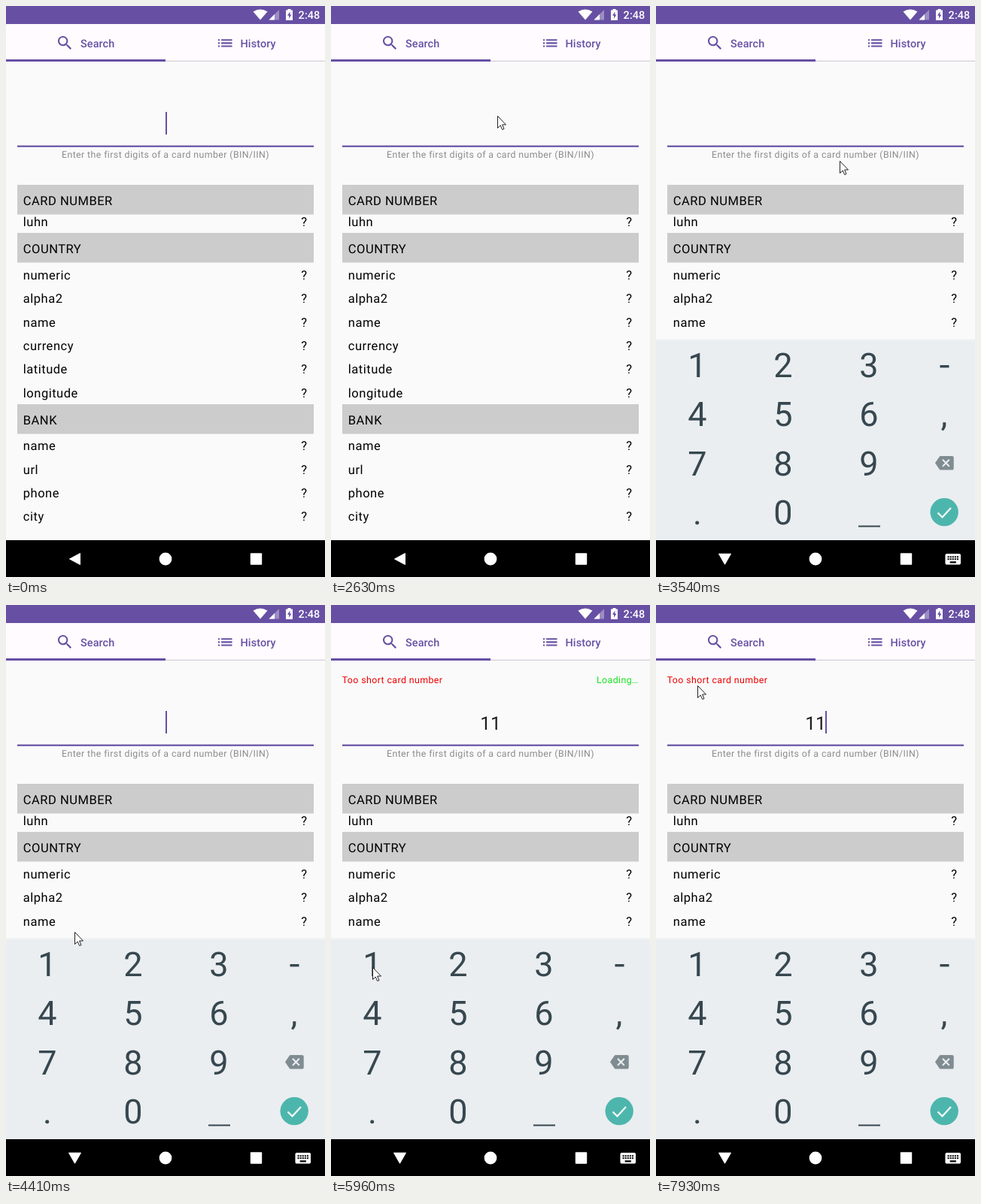
An HTML page that plays this animation: 424x760 px, repeating every 8 s.

```html
<!DOCTYPE html>
<html lang="en">
<head>
<meta charset="utf-8">
<title>Card lookup</title>
<style>
  html, body { margin: 0; width: 100%; height: 100%; overflow: hidden; background: #fafafa; }
  svg { display: block; width: 424px; height: 760px; }
  text { font-family: Roboto, sans-serif; white-space: pre; text-rendering: geometricPrecision; }
  .row { font-size: 16.5px; letter-spacing: .515px; }
  .small { font-size: 12.37px; letter-spacing: .4px; }
  .tab { font-size: 14.43px; font-weight: 500; letter-spacing: .1px; }
  .key { font-size: 45px; fill: #37474f; text-anchor: middle; }
</style>
</head>
<body>
<svg viewBox="0 0 424 760">
  <rect width="424" height="760" fill="#fafafa"/>

  <rect width="424" height="24" fill="#6750a4"/>
  <g fill="#fff">
    <path d="M338 18.5L328.5 7.5Q338 1.5 347.5 7.5Z"/>
    <path d="M363 5V18.5H349.5Z" opacity=".35"/>
    <path d="M357 11V18.5H349.5Z"/>
    <path d="M372 5.5h2.5V4h4v1.5H381V19h-9Z"/>
    <path d="M377.4 7.5L374 12.8h2.1v4l3.3-5.4h-2Z" fill="#6750a4"/>
    <text class="tab" x="388.6" y="17">2:48</text>
  </g>

  <rect y="24" width="424" height="49" fill="#fffbfe"/>
  <rect y="72.8" width="424" height="1" fill="#cac4d0"/>
  <g fill="#6750a4">
    <rect y="71" width="212" height="3"/>
    <path transform="translate(65.9 36.8) scale(1.03)" d="M15.5 14h-.79l-.28-.27C15.41 12.59 16 11.11 16 9.5 16 5.91 13.09 3 9.5 3S3 5.91 3 9.5 5.91 16 9.5 16c1.61 0 3.09-.59 4.23-1.57l.27.28v.79l5 4.99L20.49 19l-4.99-5zm-6 0C7.01 14 5 11.99 5 9.5S7.01 5 9.5 5 14 7.01 14 9.5 11.99 14 9.5 14z"/>
    <path transform="translate(278.9 37) scale(1.03)" d="M3 13h2v-2H3v2zm0 4h2v-2H3v2zm0-8h2V7H3v2zm4 4h14v-2H7v2zm0 4h14v-2H7v2zM7 7v2h14V7H7z"/>
    <text class="tab" x="99" y="55">Search</text>
    <text class="tab" x="311.5" y="55">History</text>
    <rect x="15" y="185.6" width="394" height="2.2"/>
    <rect id="caret" y="141" width="2" height="30"/>
  </g>

  <text id="error" class="small" x="14.7" y="104.3" fill="#f00000">Too short card number</text>
  <text id="loading" class="small" x="353" y="104.3" fill="#14e61e">Loading…</text>
  <text id="entry" x="212" y="165.6" font-size="24.7" text-anchor="middle"></text>
  <text class="small" x="74" y="201.5" fill="#8c8c8c">Enter the first digits of a card number (BIN/IIN)</text>
  <g id="list"></g>

  <rect y="711" width="424" height="49"/>
  <g id="keyboard">
    <rect y="443" width="424" height="3" fill="#f1f3f5"/>
    <rect y="445" width="424" height="266" fill="#eaeef1"/>
    <rect id="press" x="2" y="450" width="106" height="54" rx="3" fill="#dde3e6"/>
    <g id="keys"></g>
    <text id="tint" class="key" x="55" y="494" style="fill:#14c81e" clip-path="inset(0 0 0 14px)">1</text>
    <g fill="#37474f">
      <rect x="377.5" y="478" width="12" height="3.4"/>
      <rect x="269" y="691.5" width="29" height="2"/>
    </g>
    <path transform="translate(371 595.9) scale(1.03)" fill="#7f8c92" d="M22 3H7c-.69 0-1.23.35-1.59.88L0 12l5.41 8.11c.36.53.9.89 1.59.89h15c1.1 0 2-.9 2-2V5c0-1.1-.9-2-2-2zm-3 12.59L17.59 17 14 13.41 10.41 17 9 15.59 12.59 12 9 8.41 10.41 7 14 10.59 17.59 7 19 8.41 15.41 12 19 15.59z"/>
    <circle cx="383.2" cy="673.6" r="18.7" fill="#4db6ac"/>
    <path d="M374.5 674.5l6 6 11.5-12.5" fill="none" stroke="#fff" stroke-width="2.2"/>
    <rect y="711" width="424" height="49"/>
  </g>

  <g fill="#fff">
    <path id="back" stroke="#fff" stroke-linejoin="round"/>
    <circle cx="212" cy="736" r="8.4"/>
    <rect x="324.8" y="728.3" width="15.4" height="15.4" rx="1"/>
    <path id="ime" transform="translate(382.4 723.9) scale(1.03)" d="M20 5H4c-1.1 0-1.99.9-1.99 2L2 17c0 1.1.9 2 2 2h16c1.1 0 2-.9 2-2V7c0-1.1-.9-2-2-2zm-9 3h2v2h-2V8zm0 3h2v2h-2v-2zM8 8h2v2H8V8zm0 3h2v2H8v-2zm-1 2H5v-2h2v2zm0-3H5V8h2v2zm9 7H8v-2h8v2zm0-4h-2v-2h2v2zm0-3h-2V8h2v2zm3 3h-2v-2h2v2zm0-3h-2V8h2v2z"/>
  </g>
  <path id="pointer" d="M.5.5V16.5L4.2 13L6.7 18.5L9 17.5L6.6 12H11.5Z" fill="#fff" stroke-width="1"/>
</svg>

<script>
const LOOP = 8000;
const $ = id => document.getElementById(id);
const [caret, error, loading, entry, keyboard, press, tint, back, ime, pointer] =
  ['caret', 'error', 'loading', 'entry', 'keyboard', 'press', 'tint', 'back', 'ime', 'pointer'].map($);

// List: header top, first row baseline, row names
const sections = [
  ['CARD NUMBER', 238, 293, 'luhn'],
  ['COUNTRY', 302, 363.8, 'numeric alpha2 name currency latitude longitude'],
  ['BANK', 530, 591.2, 'name url phone city']
];
$('list').innerHTML = sections.map(([title, top, base, names]) =>
  `<rect x="15" y="${top}" width="394" height="39.5" fill="#ccc"/>
   <text class="row" x="22.8" y="${top + 26.5}">${title}</text>` +
  names.split(' ').map((name, i) => {
    const y = base + i * 31.4;
    return `<text class="row" x="22.8" y="${y}">${name}</text><text class="row" x="392.2" y="${y}">?</text>`;
  }).join('')
).join('');

const columns = [55, 169, 283, 383];
$('keys').innerHTML = ['123 ', '456,', '789 ', '.0  '].map((line, r) =>
  [...line].map((c, i) => `<text class="key" x="${columns[i]}" y="${494 + r * 65.3}">${c}</text>`).join('')
).join('');

// Pointer: first change, last change, steps, way points
const moves = [
  [460, 1030, 9, [394, 744], [314, 438]],
  [2160, 2760, 10, [314, 438], [204, 108], [225, 156]],
  [3170, 3470, 5, [225, 156], [244, 206]],
  [3940, 4600, 11, [244, 206], [57, 486]],
  [5080, 5220, 3, [57, 486], [55, 482]],
  [6690, 7440, 12, [55, 482], [24, 220], [18, 130], [21, 103]],
  [7510, 7930, 7, [21, 103], [50, 101], [55, 107]]
];
const blinks = [490, 1000, 1490, 2020, 2520, 3030, 3540, 4040, 4540, 4880, 5960, 6490, 7000, 7510];
const slide = [[0, 0], [2960, .12], [3030, .5], [3100, .85], [3170, 1]];

const within = (t, a, b) => t >= a && t < b;
const show = (el, on) => el.setAttribute('visibility', on ? 'visible' : 'hidden');

function along(points, k) {
  const s = k * k * (3 - 2 * k) * (points.length - 1);
  const i = Math.min(Math.floor(s), points.length - 2);
  return points[i].map((v, axis) => v + (points[i + 1][axis] - v) * (s - i));
}

function pointerAt(t) {
  const move = moves.filter(m => t >= m[0]).pop();
  if (!move) return null;
  const [from, to, steps, ...points] = move;
  const step = Math.floor((t - from) / (to - from) * (steps - 1) + 1e-6) + 1;
  return along(points, Math.min(1, step / steps));
}

function draw(t) {
  const typed = t < 4810 ? '' : t < 5410 ? '1' : '11';
  const flash = within(t, 4810, 4880);
  entry.textContent = typed;
  entry.setAttribute('fill', flash ? '#14e61e' : '#1c1b1f');
  caret.setAttribute('x', [212, 219, 225][typed.length]);
  show(caret, blinks.filter(b => t >= b).length % 2 === 0);
  show(error, t >= 5480);
  show(loading, within(t, 4810, 6130));

  const p = slide.filter(s => t >= s[0]).pop()[1];
  keyboard.setAttribute('transform', `translate(0 ${146 * (1 - p)})`);
  keyboard.setAttribute('opacity', p);
  show(press, within(t, 4670, 4810) || within(t, 5280, 5410));
  show(tint, flash);
  show(ime, p > 0);
  back.setAttribute('d', p > 0 ? 'M83.5 729.2H99.5L91.5 743.2Z' : 'M84.5 736L98.5 728.5V743.5Z');

  const at = pointerAt(t);
  show(pointer, at);
  if (at) pointer.setAttribute('transform', `translate(${at.map(Math.round)})`);
  pointer.setAttribute('stroke', flash ? '#14e61e' : '#222');
}

const start = performance.now();
function frame() {
  draw((performance.now() - start) % LOOP);
  requestAnimationFrame(frame);
}
frame();
</script>
</body>
</html>
```
